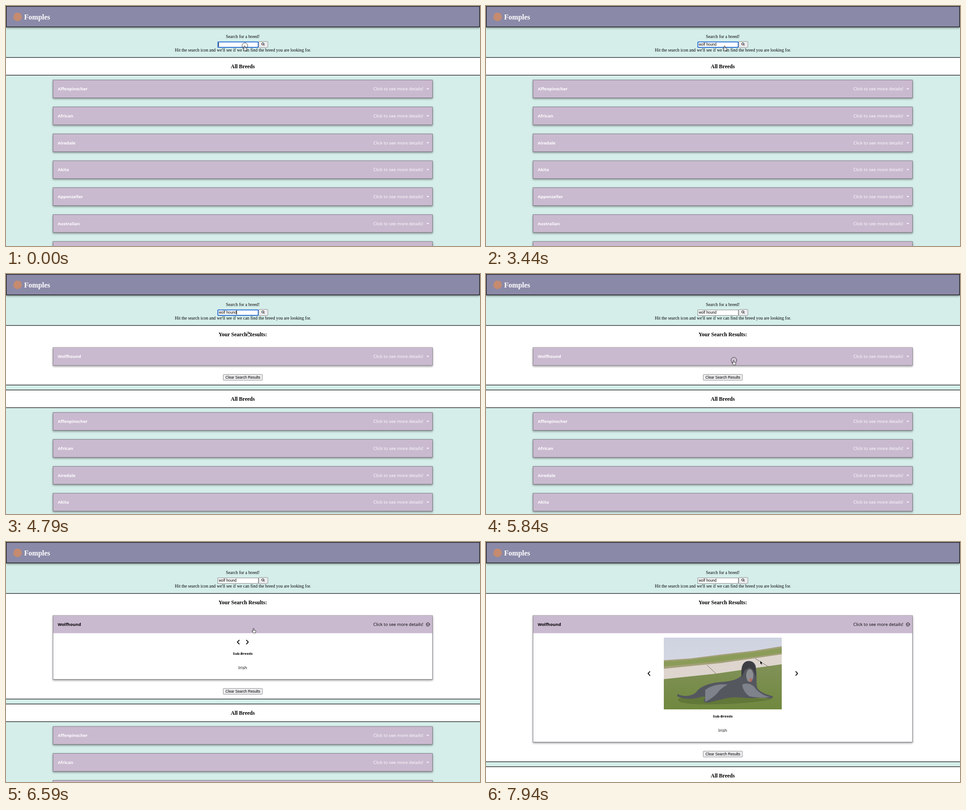
Write an HTML page that moves like this. It is 1053x532 px and loops after 8 s.

```html
<!DOCTYPE html>
<html lang="en">
<head>
<meta charset="utf-8">
<title>Breed search</title>
<style>
html, body { margin: 0; width: 100%; height: 100%; overflow: hidden; background: #d5eeea; }
svg { position: absolute; left: 0; top: 0; display: block; }
text { white-space: pre; }
.serif { font: 9.85px "Liberation Serif", serif; }
.title { font: bold 12px "Liberation Serif", serif; }
.brand { font: bold 16px "Liberation Serif", serif; }
.ui { font: 8.21px "Liberation Sans", sans-serif; }
.name { font: bold 9.45px "Open Sans", sans-serif; }
.hint { font: 9.64px "Open Sans", sans-serif; }
.sub { font: bold 7.85px "Open Sans", sans-serif; }
.mid { text-anchor: middle; }
.mint { fill: #d5eeea; }
.lilac { fill: #cabad0; }
.rule { stroke: #111; stroke-width: 1.25; }
.edge { stroke: #6b6470; stroke-width: .8; }
.btn { fill: #ececee; stroke: #777; stroke-width: .8; }
.drop { filter: drop-shadow(0 2px 2px rgba(0, 0, 0, .42)); }
.line { fill: none; stroke: #000; stroke-linecap: round; stroke-linejoin: round; }

/* All state changes are hard cuts on one 8 s clock */
.step { animation: 8s step-end infinite; }
.found { animation-name: found; }
.shut { animation-name: shut; }
.open { animation-name: open; }
.detail { animation-name: detail; }
.photo { animation-name: photo; }
.cover { animation-name: cover; }
.focus { animation-name: focus; }
.ring { animation-name: ring; }
.hand { animation-name: hand; }
.arrow { animation-name: arrow; }
.list { animation-name: list; }
.card { animation-name: card; }
.prev { animation-name: prev; }
.next { animation-name: next; }
.facts { animation-name: facts; }
.cursor { animation-name: cursor; }

@keyframes found { 0% { opacity: 0 } 44.875%, 100% { opacity: 1 } }
@keyframes shut { 0% { opacity: 1 } 74.875%, 100% { opacity: 0 } }
@keyframes open { 0% { opacity: 0 } 74.875%, 100% { opacity: 1 } }
@keyframes detail { 0% { opacity: 0 } 82.375%, 100% { opacity: 1 } }
@keyframes photo { 0% { opacity: 0 } 89.875%, 100% { opacity: 1 } }
@keyframes cover { 0% { opacity: 1 } 91.75%, 100% { opacity: 0 } }
@keyframes focus { 0% { opacity: 1 } 73%, 100% { opacity: 0 } }
@keyframes ring { 0% { opacity: 1 } 1.875% { opacity: 0 } 73% { opacity: 1 } 74.875%, 100% { opacity: 0 } }
@keyframes hand { 0% { opacity: 1 } 97.375%, 100% { opacity: 0 } }
@keyframes arrow { 0% { opacity: 0 } 97.375%, 100% { opacity: 1 } }
@keyframes list {
  0% { transform: translateY(0) }
  44.875% { transform: translateY(143px) }
  74.875% { transform: translateY(175px) }
  82.375% { transform: translateY(245px) }
  89.875%, 100% { transform: translateY(384px) }
}
@keyframes card {
  0% { height: 39.6px }
  74.875% { height: 71.6px }
  82.375% { height: 141.4px }
  89.875%, 100% { height: 280.4px }
}
@keyframes prev { 0% { transform: none } 89.875%, 100% { transform: translate(-154px, 69.5px) } }
@keyframes next { 0% { transform: none } 89.875%, 100% { transform: translate(154px, 69.5px) } }
@keyframes facts { 0% { transform: none } 89.875%, 100% { transform: translateY(139px) } }
@keyframes cursor {
  0% { transform: translate(530px, 88.4px) }
  58% { transform: translate(531px, 96px) }
  59.875% { transform: translate(538px, 128px) }
  61.75% { transform: translate(549px, 174px) }
  63.625% { transform: translate(550px, 191.5px) }
  97.375% { transform: translate(581px, 226px) }
  99.25%, 100% { transform: translate(609px, 262.8px) }
}

.typed {
  position: absolute; left: 472.4px; top: 81px; height: 9px; line-height: 9px;
  overflow: hidden; white-space: pre; border-right: 1px solid #000; color: #000;
  animation: type 8s step-end infinite, caret 8s step-end infinite;
}
@keyframes type {
  0% { width: 0 }
  1.875% { width: 5.93px }
  3.75% { width: 10.49px }
  5.625% { width: 12.31px }
  9.375% { width: 14.6px }
  22.375% { width: 16.88px }
  24.25% { width: 21.44px }
  26.125% { width: 26px }
  29.875% { width: 30.57px }
  31.75% { width: 35.13px }
  35.5%, 100% { width: 39.9px }
}
@keyframes caret {
  0%, 20.5%, 48.625%, 59.875% { border-color: #000 }
  14.875%, 43%, 54.25%, 67.375%, 100% { border-color: transparent }
}
</style>
</head>
<body>
<svg width="1053" height="532" viewBox="0 0 1053 532">
  <rect class="mint" width="1053" height="532"/>

  <g class="step found">
    <rect y="114" width="1053" height="418" fill="#fff"/>
    <path class="rule" d="M0 114.2H1053"/>
    <text class="title mid" x="526" y="138">Your Search Results:</text>
    <rect class="step card drop edge" x="104.5" y="163" width="843" height="39.6" fill="#fff"/>
    <rect class="lilac" x="104.9" y="163.4" width="842.2" height="38.8"/>
    <g class="step shut" fill="#fff">
      <text class="name" x="115" y="186.4">Wolfhound</text>
      <text class="hint" x="816" y="186.4">Click to see more details!</text>
      <path d="M934.2 181.6h5.6l-2.8 3z"/>
    </g>
    <g class="step open">
      <text class="name" x="115" y="186.4">Wolfhound</text>
      <text class="hint" x="816" y="186.4">Click to see more details!</text>
      <circle class="line" cx="937.2" cy="182.8" r="3.7"/>
      <path class="line" d="M935.4 182.2l1.8 1.7 1.8-1.7"/>
    </g>
    <g class="step detail">
      <path class="step prev line" stroke-width="1.8" d="M518 217.7l-4 4.2 4 4.2"/>
      <path class="step next line" stroke-width="1.8" d="M534.2 217.7l4 4.2-4 4.2"/>
      <g class="step facts">
        <text class="sub mid" x="526" y="249.7">Sub-Breeds</text>
        <text class="hint mid" x="526" y="281.8">Irish</text>
      </g>
    </g>
    <g class="step photo">
      <svg x="395" y="212" width="262" height="159">
        <defs>
          <linearGradient id="lawn" x2="0" y2="1">
            <stop stop-color="#819158"/><stop offset="1" stop-color="#70883f"/>
          </linearGradient>
          <linearGradient id="road" x2="0" y2="1">
            <stop stop-color="#ced3e1"/><stop offset="1" stop-color="#d6d8e2"/>
          </linearGradient>
        </defs>
        <rect width="262" height="70" fill="url(#road)"/>
        <path fill="#a3a078" d="M0 50L60 46 130 37 200 29 262 19V39L130 58 0 70Z"/>
        <path fill="#8b9c59" d="M0 53L60 49 130 40 200 32 262 23V34L130 52 0 64Z"/>
        <path fill="#ded5ce" d="M0 69L130 56 262 37V70L0 100Z"/>
        <path fill="url(#lawn)" d="M0 92L115 80 205 67 262 59V159H0Z"/>
        <path class="line" style="stroke:#6e6862" d="M96 61l21 20M203 46l30 19"/>
        <path fill="#50682f" opacity=".5" d="M34 134Q100 122 170 130T246 136Q180 148 100 148T34 134Z"/>
        <path fill="#55575f" d="M30 125C45 132 62 130 72 121C82 106 105 100 130 98C150 97 165 92 173 84C172 70 173 55 186 52C198 50 206 58 205 72C208 88 204 100 208 112C214 122 230 126 242 130C244 135 236 136 228 134C215 132 205 134 195 134C175 134 160 130 140 134C125 138 112 140 100 144C90 145 86 141 90 136C96 130 90 130 80 132C62 138 42 136 30 130Z"/>
        <path fill="#7e828b" d="M92 116Q112 101 142 104Q126 112 118 124Q106 136 92 142Q92 126 92 116ZM174 104Q188 98 200 108Q212 126 236 132Q210 134 190 130Q176 120 174 104Z"/>
        <path fill="#3d3e44" d="M173 88C171 66 174 55 186 52C199 51 207 62 204 86L199 72 190 66 180 72Z"/>
        <ellipse cx="191" cy="84" rx="8" ry="14" fill="#8d8e92"/>
        <ellipse cx="193" cy="94" rx="2.6" ry="4" fill="#b9685b"/>
      </svg>
      <rect class="step cover" x="394" y="270" width="264" height="102" fill="#fff"/>
    </g>
  </g>

  <g class="step list">
    <rect class="mint" y="103" width="1053" height="480"/>
    <g class="step found">
      <rect y="70" width="1053" height="33" fill="#fff"/>
      <path class="rule" d="M0 103H1053"/>
      <rect class="btn" x="482.5" y="79.6" width="87.3" height="13" rx="1.5"/>
      <text class="ui mid" x="526.2" y="89">Clear Search Results</text>
    </g>
    <rect y="114" width="1053" height="39" fill="#fff"/>
    <path class="rule" d="M0 114.2H1053M0 153.3H1053"/>
    <text class="title mid" x="526" y="138">All Breeds</text>
    <g id="cards"></g>
  </g>

  <rect class="drop" x=".6" y=".8" width="1051.6" height="45.6" fill="#8a89a8" stroke="#111" stroke-width="1.3"/>
  <circle cx="25.6" cy="24" r="9.4" fill="#c58b70"/>
  <text class="brand" x="40.3" y="30" fill="#fff">Fomples</text>

  <text class="serif mid" x="526" y="71">Search for a breed!</text>
  <text class="serif mid" x="526.4" y="101.4">Hit the search icon and we'll see if we can find the breed you are looking for.</text>
  <rect x="470.4" y="79.7" width="90" height="12.2" fill="#fff" stroke="#777" stroke-width=".9"/>
  <rect class="step focus" x="470.6" y="79.7" width="89.7" height="12" rx="1.2" fill="#fff" stroke="#1262d3" stroke-width="1.7"/>
  <rect class="btn" x="561.4" y="78.6" width="20.4" height="13.6" rx="1.5"/>
  <circle class="line" cx="570.6" cy="84" r="2.5"/>
  <path class="line" d="M572.5 85.9l1.6 1.6"/>
</svg>

<div class="typed ui">wolf hound</div>

<svg width="1053" height="532" viewBox="0 0 1053 532">
  <g class="step cursor">
    <circle class="step ring" cx=".7" cy="-.4" r="6.3" fill="#fff" fill-opacity=".15" stroke="#222" stroke-width=".9"/>
    <path class="step hand" fill="#fff" stroke="#000" stroke-width=".8" stroke-linejoin="round"
      d="M-1 .9a1 1 0 0 1 2 0V4l3.1.8q1.2.4 1 1.8l-.8 3.3h-4.9l-3-3.8q-.4-1.3 1-1l1.6 1.2z"/>
    <path class="step arrow" stroke="#fff" stroke-width=".6" d="M0 0V8.6l2-1.8 1.4 3.2 1.5-.7-1.4-3.1h2.7z"/>
  </g>
</svg>

<script>
const breeds = ["Affenpinscher", "African", "Airedale", "Akita", "Appenzeller", "Australian", "Basenji"];
document.getElementById("cards").innerHTML = breeds.map((breed, i) => `
  <g transform="translate(0 ${164 + i * 59.67})">
    <rect class="lilac edge drop" x="104.5" width="843" height="39.6"/>
    <g fill="#fff">
      <text class="name" x="115" y="23.4">${breed}</text>
      <text class="hint" x="816" y="23.4">Click to see more details!</text>
      <path d="M934.2 18.6h5.6l-2.8 3z"/>
    </g>
  </g>`).join("");
</script>
</body>
</html>
```
